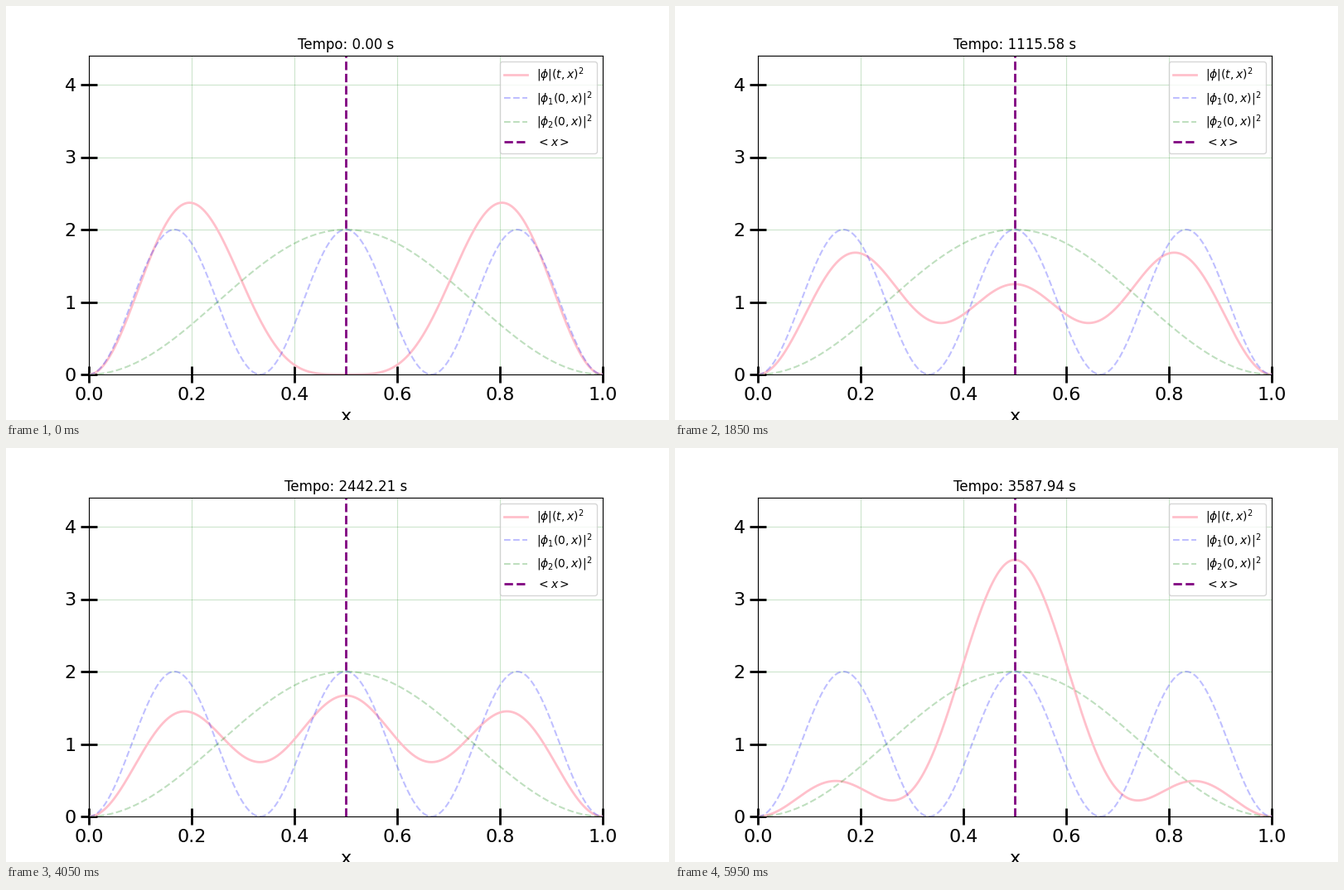
Recreate the animation shown at these times as a matplotlib script. Size 800 px wide and 500 px high, loop 6 s.

```python
import numpy as np
import matplotlib.pyplot as plt
from matplotlib.animation import FuncAnimation

HBAR = 1.054571817e-34
MASS = 9.1093837e-31
WIDTH = 1.0
FRAMES = 120

x = np.linspace(0, WIDTH, 1000)
times = np.linspace(0, 6000, 200)


def state(n):
    """Stationary state n of the infinite well."""
    return np.sqrt(2 / WIDTH) * np.sin(n * np.pi * x / WIDTH)


def energy(n):
    return (n * np.pi * HBAR / WIDTH) ** 2 / (2 * MASS)


def density(t):
    """Probability density of the equal mix of states 1 and 3."""
    beat = (energy(3) - energy(1)) / HBAR
    a, b = state(3), state(1)
    return (a**2 + b**2) / 2 + a * b * np.cos(beat * t)


fig, ax = plt.subplots(figsize=(8, 5), dpi=100)
ax.set_xlim(0, WIDTH)
ax.set_ylim(0, 4.4)
ax.set_yticks(range(5))
ax.set_xlabel("x", fontsize=16)
ax.tick_params(direction="inout", length=15, width=2, labelsize=16)
ax.grid(color="green", alpha=0.2, linewidth=0.8)

wave, = ax.plot(x, density(0), color="pink", lw=2, label=r"$|\phi|(t,x)^2$")
ax.plot(x, state(3) ** 2, "--", color="blue", alpha=0.25, lw=1.5,
        label=r"$|\phi_1(0,x)|^2$")
ax.plot(x, state(1) ** 2, "--", color="green", alpha=0.25, lw=1.5,
        label=r"$|\phi_2(0,x)|^2$")
ax.axvline(WIDTH / 2, color="purple", ls="--", lw=2, label="$<x>$")
ax.legend(loc="upper right", fontsize=10)
title = ax.set_title("Tempo: 0.00 s", fontsize=12)


def update(i):
    t = times[i]
    wave.set_ydata(density(t))
    title.set_text(f"Tempo: {t:.2f} s")
    return wave, title


anim = FuncAnimation(fig, update, frames=FRAMES, interval=50,
                     repeat=True, repeat_delay=0, blit=False)
plt.show()
```
